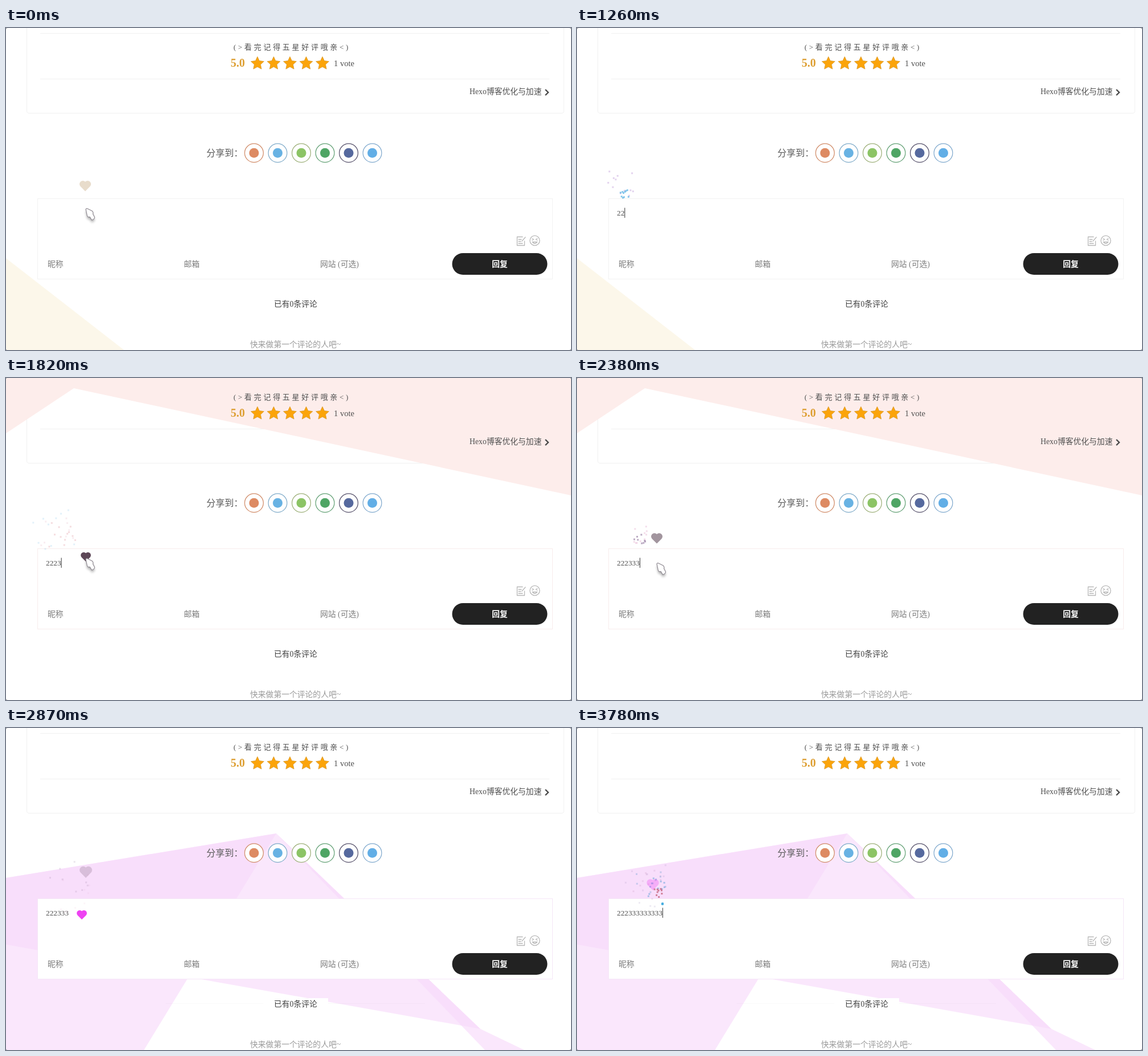
An HTML page with a canvas that plays this animation: 991 px wide and 565 px high, repeating every 3850 ms.

```html
<!DOCTYPE html>
<html lang="zh-CN">
<head>
<meta charset="utf-8">
<title>评论</title>
<style>
  html, body { margin: 0; width: 991px; height: 565px; overflow: hidden; background: #8a8a8a; }
  #stage { position: relative; width: 991px; height: 565px; overflow: hidden; background: #fff; border-radius: 3px; }
  svg, canvas { position: absolute; left: 0; top: 0; }
  text { font: 13.8px "Liberation Serif", "Noto Sans CJK SC", "Noto Sans CJK", serif; fill: #505050; white-space: pre; }
  .hint { fill: #7c7c7c; }
  .line { stroke: #f1f1f1; fill: none; }
  .icon { stroke: #b8b8b8; stroke-width: 1.3; fill: none; stroke-linecap: round; }
</style>
</head>
<body>
<div id="stage">
  <svg width="991" height="565" viewBox="0 0 991 565">
    <g class="line">
      <path d="M36.5 0V146Q36.5 149.5 40 149.5H975Q978.5 149.5 978.5 146V0"/>
      <path d="M60 9.5H953M60 89.5H953"/>
    </g>
    <g id="cream" fill="#fcf7ea"><path d="M0 404L207 565H0Z"/></g>
    <g id="pink" fill="#fdedeb"><path d="M0 0H991V206L119 18L0 97Z"/></g>
    <g id="violet" fill="#f7dafa" fill-opacity=".65">
      <path d="M0 263L474 185L242 565H0Z"/>
      <path d="M0 263L474 185L832 528L0 380Z"/>
      <path d="M474 185L832 528L909 565H840Z"/>
      <path d="M280 483.5H735" stroke="#000" stroke-opacity=".025"/>
    </g>
    <rect x="451" y="474" width="114" height="20" fill="#fff"/>
    <rect id="box" x="55.5" y="299.5" width="903" height="141" fill="#fff" stroke="#f2f2f2"/>

    <text x="399" y="38" style="font-size:13px;letter-spacing:3.7px">(&gt;看完记得五星好评哦亲&lt;)</text>
    <text x="394" y="68" style="font-size:20px;font-weight:bold;fill:#dd9f33">5.0</text>
    <g id="stars" fill="#fba40a" stroke="#d99a2b" stroke-width=".8"></g>
    <text x="575" y="67" style="font-size:14.5px">1 vote</text>
    <text x="813" y="116.3">Hexo博客优化与加速</text>
    <path d="M946 108L951 113L946 118" fill="none" stroke="#4a4a4a" stroke-width="2.4"/>
    <text x="351.5" y="225" style="font-size:16px;fill:#5a5a5a">分享到：</text>
    <g id="share"></g>

    <g class="icon">
      <path d="M906 366.5H896.5V381.5H909.5V374M899 371H904M899 374.5H903M899 378H906M905 374L911 367"/>
      <circle cx="927.5" cy="373" r="8.6"/>
      <path d="M923 369.5L925.5 371L923 372.5M932 369.5L929.5 371L932 372.5M923.5 375.5Q927.5 381 931.5 375.5Z"/>
    </g>
    <text class="hint" x="73" y="418.7">昵称</text>
    <text class="hint" x="312" y="418.7">邮箱</text>
    <text class="hint" x="551" y="418.7">网站 (可选)</text>
    <rect x="782.5" y="395" width="167" height="38" rx="19" fill="#222"/>
    <text x="866" y="418.7" text-anchor="middle" style="font-weight:bold;fill:#fff">回复</text>
    <text x="470" y="489" style="fill:#404040">已有0条评论</text>
    <text x="428" y="560" style="fill:#999">快来做第一个评论的人吧~</text>
    <text id="typed" x="70" y="329" style="font-size:13.3px"></text>
    <path id="caret" stroke="#333"/>
  </svg>
  <canvas id="fx" width="991" height="565"></canvas>
</div>
<script>
const LOOP = 3850, STEP = 70, FRAME = 1000 / 60, CHAR = 6.65;
const $ = id => document.getElementById(id);
const ctx = $('fx').getContext('2d');

// Key presses: time, character, spark colour
const keys = [
  [860, '2', '#b58ad2'],
  [1125, '2', '#5db3e4'],
  [1270, '2', '#e9b9c8'],
  [1400, '3', '#e2a0a8'],
  [1985, '3', '#e3a9cb'],
  [2180, '3', '#94789f'],
  [3070, '3', '#9a86b8'],
  [3210, '3', '#c99ac0'],
  [3350, '3', '#6a9fd0'],
  [3490, '3', '#5a9ed6'],
  [3630, '3', '#c0566c'],
  [3770, '3', '#45aee0']
];
// Clicks: time, x, y, heart colour
const hearts = [
  [-620, 139, 314, '212,189,157'],
  [1815, 140, 315, '92,70,86'],
  [2865, 133, 329, '238,66,242']
];
const scenes = [['cream', 0], ['pink', 1820], ['violet', 2870]];

function random(seed) {
  return () => (seed = (seed * 16807) % 2147483647) / 2147483647;
}

const sparks = keys.flatMap(([t, , color], i) => {
  const rnd = random(7919 * (i + 3));
  rnd();
  return Array.from({ length: 7 + Math.floor(rnd() * 6) }, () => ({
    t, color, x: 70 + CHAR * (i + 1), vx: rnd() * 2 - 1, vy: rnd() * 2 - 3.5
  }));
});

function star(cx, cy) {
  return 'M' + Array.from({ length: 10 }, (_, i) => {
    const a = i * Math.PI / 5 - Math.PI / 2, r = i % 2 ? 5.8 : 12;
    return (cx + r * Math.cos(a)).toFixed(1) + ' ' + (cy + r * Math.sin(a)).toFixed(1);
  }).join('L') + 'Z';
}
$('stars').innerHTML = [0, 1, 2, 3, 4]
  .map(i => `<path d="${star(441 + 28.5 * i, 62.3)}"/>`).join('');

$('share').innerHTML = [
  ['#d08a66', '#dd8a62'], ['#7fabc9', '#68b2e3'], ['#9db07a', '#8cc465'],
  ['#5f9f72', '#4fa565'], ['#55506a', '#56699e'], ['#7ea8cd', '#62aee6']
].map(([ring, dot], i) => {
  const x = 435 + 41.5 * i;
  return `<circle cx="${x}" cy="219.3" r="16.4" fill="#fff" stroke="${ring}" stroke-width="1.2"/>` +
    `<circle cx="${x}" cy="219.3" r="8.5" fill="${dot}"/>`;
}).join('');

function drawHeart(t, [start, x, y, rgb]) {
  const n = (t - start) * 0.058, alpha = 1 - 0.013 * n;
  if (n < 0 || alpha <= 0) return;
  const s = 1.04 + 0.004 * n;
  ctx.save();
  ctx.translate(x, y - n);
  ctx.rotate(Math.PI / 4);
  ctx.scale(s, s);
  ctx.fillStyle = `rgba(${rgb},${alpha})`;
  ctx.beginPath();
  ctx.moveTo(5, 5);
  ctx.lineTo(-5, 5);
  ctx.arc(-5, 0, 5, Math.PI / 2, Math.PI * 1.5);
  ctx.arc(0, -5, 5, Math.PI, Math.PI * 2);
  ctx.fill();
  ctx.restore();
}

function drawSpark(t, p) {
  const n = (t - p.t) / FRAME, alpha = 0.96 ** n;
  if (n < 0 || alpha < 0.1) return;
  ctx.globalAlpha = alpha;
  ctx.fillStyle = p.color;
  ctx.fillRect(p.x + p.vx * n - 1.5, 310 + p.vy * n + 0.0375 * n * n - 1.5, 3, 3);
}

const pointer = new Path2D('M0 1Q1 -1 3 0L11 4Q13.5 6 12.5 9.5L15.5 15Q15 19 10.5 20L7 14.5Q3 15.5 2.3 12Z');
function drawPointer(t) {
  if ((t >= 860 && t < 1680) || t >= 2870) return;
  const drop = Math.min(1, Math.max(0, (t - 2030) / 210));
  const slide = Math.min(1, Math.max(0, (t - 2590) / 210));
  ctx.save();
  ctx.translate(140 - 6 * slide, 317 + 8 * drop + 5 * slide);
  ctx.fillStyle = '#fff';
  ctx.shadowColor = 'rgba(0,0,0,.32)';
  ctx.shadowBlur = 4;
  ctx.shadowOffsetY = 4;
  ctx.fill(pointer);
  ctx.shadowColor = 'transparent';
  ctx.strokeStyle = '#8f8a92';
  ctx.lineWidth = 1.2;
  ctx.stroke(pointer);
  ctx.restore();
}

function render(t) {
  const scene = scenes.filter(s => t >= s[1]).pop()[0];
  for (const [id] of scenes) $(id).style.display = id === scene ? '' : 'none';
  $('box').setAttribute('stroke', { cream: '#f2f2f2', pink: '#f8ecec', violet: '#f5e6f7' }[scene]);

  const done = keys.filter(k => t >= k[0]);
  $('typed').textContent = done.map(k => k[1]).join('');
  const idle = t - (done.length ? done[done.length - 1][0] : -720);
  $('caret').style.display = idle % 1000 < 500 ? '' : 'none';
  $('caret').setAttribute('d', `M${70.5 + CHAR * done.length} 315.5V333`);

  ctx.clearRect(0, 0, 991, 565);
  sparks.forEach(p => drawSpark(t, p));
  ctx.globalAlpha = 1;
  hearts.forEach(h => drawHeart(t, h));
  drawPointer(t);
}

const began = performance.now();
function tick() {
  const t = (performance.now() - began) % LOOP;
  render(Math.floor(t / STEP) * STEP);
  requestAnimationFrame(tick);
}
tick();
</script>
</body>
</html>
```
